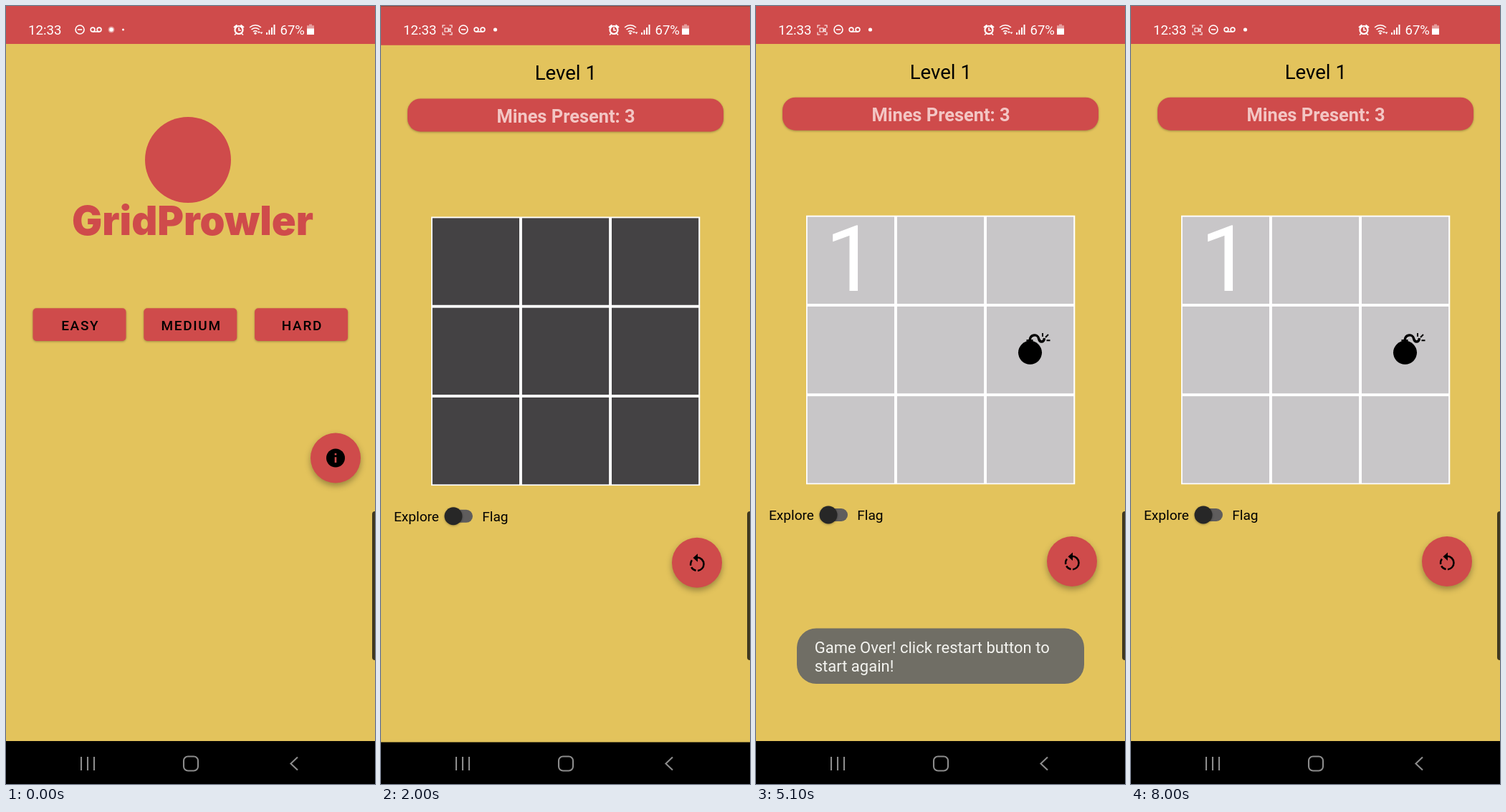
An HTML page that plays this animation: 515 px wide and 1087 px high, repeating every 8400 ms.

```html
<!DOCTYPE html>
<html lang="en">
<head>
<meta charset="utf-8">
<title>Minesweeper demo</title>
<style>
  html, body { margin: 0; width: 100%; height: 100%; overflow: hidden; background: #000; }
  svg { display: block; width: 515px; height: 1087px; font-family: Roboto, sans-serif; }
  .red { fill: #cf4b4b; }
  .page { fill: #e3c35c; }
  .mid { text-anchor: middle; }
  .low { filter: drop-shadow(0 1.5px 1.5px rgba(0,0,0,.3)); }
  .high { filter: drop-shadow(0 4px 4px rgba(0,0,0,.32)); }
  .caps { font-size: 19px; font-weight: 500; letter-spacing: .089em; text-anchor: middle; }
  .line { fill: none; stroke: #fff; stroke-width: 1.6; }
  .thin { stroke-width: 1.1; }
  .bold { stroke-width: 2.2; }
  .nav { fill: none; stroke: #fff; stroke-width: 2.1; opacity: .55; }
</style>
</head>
<body>
<svg viewBox="0 0 515 1087">
  <defs>
    <clipPath id="easyClip"><rect x="37.5" y="422" width="130" height="46" rx="5"/></clipPath>
    <g id="window">
      <rect class="page" width="515" height="1027"/>
      <rect class="red" width="515" height="53"/>
      <rect y="1027" width="515" height="300"/>
    </g>
  </defs>

  <g id="menu">
    <use href="#window"/>
    <circle class="red" cx="254" cy="215" r="60"/>
    <text class="red mid" x="260.5" y="320" font-family="Inter, sans-serif" font-weight="900" font-size="56">GridProwler</text>
    <g id="buttons"></g>
    <circle id="ripple" cx="103" cy="445" clip-path="url(#easyClip)" opacity=".14"/>
    <circle class="red high" cx="460" cy="631.5" r="35"/>
    <circle cx="460" cy="631.5" r="13"/>
    <path class="red" d="M458.7 625h2.6v2.6h-2.6zM458.7 630.2h2.6v7.8h-2.6z"/>
  </g>
  <rect id="dim" width="515" height="1087"/>

  <g id="game">
    <use href="#window"/>
    <text class="mid" x="257.8" y="101.5" font-size="27.6">Level 1</text>
    <rect class="red low" x="37" y="127.7" width="441" height="46" rx="18"/>
    <text class="mid" x="258" y="161" font-size="25.4" font-weight="700" fill="#f3c6c4">Mines Present: 3</text>
    <rect x="70" y="292.7" width="375.3" height="375.6" fill="#fff"/>
    <g id="tiles"></g>
    <text id="digit" class="mid" x="132.5" y="398" font-size="128" fill="#fff">1</text>
    <g id="bomb">
      <circle cx="382.5" cy="484.3" r="16.5"/>
      <path d="M377.5 471v-5h9v5"/>
      <g fill="none" stroke="#000">
        <path d="M382 467C383 458 393 458 394.5 464.500C396 471 402 470 402.500 464" stroke-width="3.4"/>
        <path d="M400 457v5M404 463l4-4M405.500 467.300h5" stroke-width="2"/>
      </g>
    </g>
    <g font-size="19.1">
      <text x="18" y="718.4">Explore</text>
      <text x="141.200" y="718.4">Flag</text>
    </g>
    <rect x="95" y="702" width="33" height="18" rx="9" fill="#5f5d5d"/>
    <circle class="low" cx="101" cy="711" r="12.500" fill="#272727"/>
    <circle class="red high" cx="441" cy="776" r="35"/>
    <circle cx="441.300" cy="778" r="9.200" fill="none" stroke="#000" stroke-width="2.500"
      stroke-dasharray="28 2.500 8 2.500 8 20" transform="rotate(-90 441.300 778)"/>
    <path d="M435.500 769.200L442 763.500V775z"/>
  </g>

  <g id="toast">
    <rect x="57" y="869.500" width="401" height="77.500" rx="27" fill="#706e65"/>
    <g font-size="22" fill="#f4f4f0">
      <text x="81.700" y="904">Game Over! click restart button to</text>
      <text x="81.700" y="930">start again!</text>
    </g>
  </g>

  <g fill="#fff">
    <text x="31" y="40" font-size="18.700">12:33</text>
    <text x="382.500" y="40" font-size="18.500">67%</text>
    <g id="recorder">
      <path class="line thin" d="M86 30.500V27h3.500M95.500 27H99v3.500M99 36.500V40h-3.500M89.500 40H86v-3.500"/>
      <path id="camera" class="line thin" d="M89 31h5v5h-5zM94 33.500l3-2v4.500l-3-2"/>
    </g>
    <g id="notices">
      <circle class="line" cx="115" cy="33" r="6"/>
      <path class="line" d="M111.800 33h6.400"/>
      <circle class="line" cx="133" cy="33" r="2.900"/>
      <circle class="line" cx="142" cy="33" r="2.900"/>
      <path class="line" d="M133 35.900h9"/>
      <circle id="dot" cx="159.500" cy="33" r="2.600"/>
    </g>
    <g id="leaving">
      <circle cx="147" cy="33" r="4.500" opacity=".4"/>
      <circle cx="147" cy="33" r="2.800"/>
      <circle cx="163.500" cy="33" r="1.500"/>
    </g>
    <circle class="line bold" cx="325" cy="33.500" r="5.500"/>
    <path class="line" d="M325 30v4h3M321 38.500l-2 2M329 38.500l2 2"/>
    <path class="line bold" d="M318 30l4.500-3.500M332 30l-4.500-3.500"/>
    <path class="line" d="M340 30Q348 23.500 356 30M342.500 33Q348 28.500 353.500 33M345 36Q348 33.500 351 36"/>
    <circle cx="348" cy="38.200" r="1.600"/>
    <path d="M351 37.500l2-2.500 2 2.500zM354.500 36.500h4l-2 2.700z"/>
    <path d="M363 37h2v3h-2zM366.500 33.500h2V40h-2zM370 30h2v10h-2zM373.500 26h2v14h-2z"/>
    <path d="M423 25.500h4v1.700h3V40h-10V27.200h3z" opacity=".45"/>
    <path d="M420 31.500h10V40h-10z"/>
  </g>

  <rect x="511" y="706" width="12" height="208" rx="4" fill="#40381f"/>
  <path class="nav" d="M105 1049v19M114 1049v19M123 1049v19M407 1049.500l-9.500 9 9.500 9"/>
  <rect class="nav" x="248" y="1048.500" width="20" height="20" rx="6"/>
</svg>
<script>
const LOOP = 8400, OPEN = 1646, OPEN_TIME = 425;
const $ = id => document.getElementById(id);
const clamp = x => Math.min(1, Math.max(0, x));
const show = (id, on) => $(id).style.display = on ? '' : 'none';
const fade = (id, a) => $(id).setAttribute('opacity', a);
const shift = (id, x, y) => $(id).setAttribute('transform', `translate(${x} ${y})`);

$('buttons').innerHTML = ['EASY', 'MEDIUM', 'HARD'].map((name, i) => {
  const x = 37.5 + i * 154.8;
  return `<rect class="red low" x="${x}" y="422.3" width="130" height="45.7" rx="5"/>
    <text class="caps" x="${x + 66.3}" y="453">${name}</text>`;
}).join('');

$('tiles').innerHTML = Array.from({ length: 9 }, (_, i) =>
  `<rect x="${71.8 + i % 3 * 125.1}" y="${294.6 + Math.floor(i / 3) * 125.3}" width="121.2" height="121.4"/>`
).join('');

// Cubic curve (.4, 0, .2, 1), solved for x by bisection
function ease(x) {
  let lo = 0, hi = 1, u;
  for (let i = 0; i < 20; i++) {
    u = (lo + hi) / 2;
    const v = 1 - u;
    if (1.2 * v * v * u + .6 * v * u * u + u ** 3 < x) lo = u; else hi = u;
  }
  return u * u * (3 - 2 * u);
}

function draw(t) {
  const p = ease(clamp((t - OPEN) / OPEN_TIME));
  shift('menu', 0, -48 * p);
  fade('dim', .19 * p * p);
  show('game', t >= OPEN);
  shift('game', 0, t < OPEN + OPEN_TIME ? 108.7 * (1 - p) : 0);
  fade('game', clamp((t - OPEN) / 80));
  $('ripple').setAttribute('r', 75 * clamp((t - 1450) / 225));

  const over = t >= 4500;
  $('tiles').setAttribute('fill', over ? '#c8c6c8' : '#444244');
  show('digit', t >= 3900);
  show('bomb', over);
  fade('toast', clamp((t - 4600) / 375) * clamp((7000 - t) / 450));

  const arrive = clamp(t / 200);
  fade('recorder', arrive);
  show('camera', t % 1000 < 500);
  shift('notices', -12 * (1 - arrive), 0);
  fade('dot', arrive);
  fade('leaving', 1 - arrive);
}

const start = performance.now();
function tick() {
  draw((performance.now() - start) % LOOP);
  requestAnimationFrame(tick);
}
tick();
</script>
</body>
</html>
```
